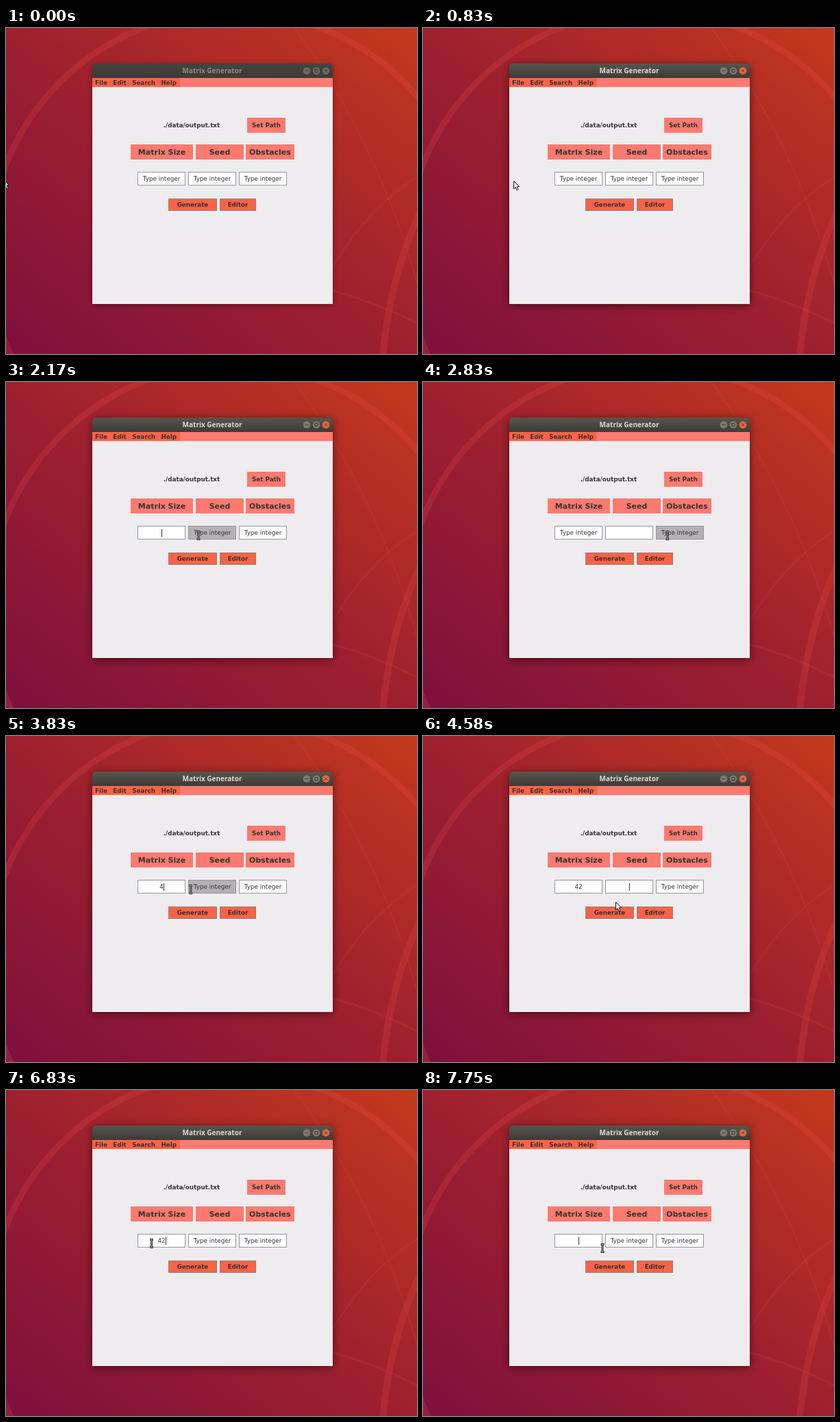
Recreate the animation shown at these times as an HTML page with a canvas. Size 600x476 px, loop 8 s.

```html
<!DOCTYPE html>
<html lang="en">
<head>
<meta charset="utf-8">
<title>Matrix Generator</title>
<style>
  html, body { margin: 0; width: 100%; height: 100%; overflow: hidden; background: #9e202f; }
  canvas { display: block; }
</style>
</head>
<body>
<canvas id="stage" width="600" height="476"></canvas>
<script>
const ctx = document.getElementById('stage').getContext('2d');
const LOOP = 8000, TICK = 1000 / 12, BLINK = 500, GLIDE = 500;
const SANS = '"DejaVu Sans", sans-serif';
const TOMATO = '#ff6347', SALMON = '#fd7a70', INK = '#333', BAR = '#3c3b37';
const FIELDS = 3, EDITOR = 3;
const fieldX = i => 192.5 + 74 * i;

// What the user does; every step has the time it takes effect
const move = (at, x, y) => ({ at, x, y });
const click = (at, field) => ({ at, x: fieldX(field) + 20, y: 224, focus: () => field });
const tab = at => ({ at, focus: current => current + 1 });
const type = (at, key) => ({ at, edit: text => text + key });
const erase = at => ({ at, edit: text => text.slice(0, -1) });

const SCRIPT = [
  move(0, -4, 221),
  click(1040, 0), click(2250, 1), click(2900, 2), click(3495, 0),
  type(3740, '4'), move(3950, 281, 224), type(3990, '2'),
  tab(4495), move(4580, 281, 242), tab(5165), tab(5745),
  move(6500, 164, 232), click(6740, 0), move(7580, 262, 231),
  erase(7660), erase(7745)
];
const STOPS = SCRIPT.filter(step => 'x' in step);

function pointerAt(t) {
  const next = STOPS.findIndex(stop => stop.at > t);
  if (next < 0) return STOPS[STOPS.length - 1];
  const from = STOPS[next - 1], to = STOPS[next];
  const span = Math.min(GLIDE, to.at - from.at);
  const k = Math.max(0, 1 - (to.at - t) / span);
  const ease = k * k * (3 - 2 * k);
  return { x: from.x + (to.x - from.x) * ease, y: from.y + (to.y - from.y) * ease };
}

function stateAt(t) {
  const state = { focus: -1, text: '', caretStart: 0 };
  for (const { at, focus, edit } of SCRIPT) {
    if (at > t) break;
    if (focus) state.focus = focus(state.focus);
    if (edit) state.text = edit(state.text);
    if (focus || edit) state.caretStart = at;
  }
  state.caret = (t - state.caretStart) % (2 * BLINK) < BLINK;
  return state;
}

function box(x, y, w, h, fill, border) {
  ctx.fillStyle = fill;
  ctx.fillRect(x, y, w, h);
  if (border) {
    ctx.strokeStyle = border;
    ctx.lineWidth = 1;
    ctx.strokeRect(x, y, w, h);
  }
}

function label(text, x, y, { size = 8.75, weight = 'bold', color = INK, family = SANS, align = 'center' } = {}) {
  ctx.font = `${weight} ${size}px ${family}`;
  ctx.textAlign = align;
  ctx.fillStyle = color;
  ctx.fillText(text, x, y);
  return ctx.measureText(text).width;
}

function button(text, x, y, w, h, fill, border, size = 8.75) {
  box(x, y, w, h, fill, border);
  label(text, x + w / 2, y + h / 2 + size * 0.36, { size });
}

function line(path, color, width) {
  ctx.strokeStyle = color;
  ctx.lineWidth = width;
  ctx.stroke(new Path2D(path));
}

function gradient(x0, y0, x1, y1, ...colors) {
  const g = ctx.createLinearGradient(x0, y0, x1, y1);
  colors.forEach((color, i) => g.addColorStop(i / (colors.length - 1), color));
  return g;
}

function wallpaper() {
  box(0, 0, 600, 476, gradient(68, 530, 532, -54, '#7d103c', '#9e202f', '#c4391c'));
  const band = 'rgba(235,75,75,.22)', hair = 'rgba(235,80,70,.14)';
  ctx.beginPath();
  ctx.arc(330, 330, 355, 0, 7);
  ctx.strokeStyle = band;
  ctx.lineWidth = 9;
  ctx.stroke();
  line('M550 480Q560 365 604 270', band, 10);
  line('M420 -2Q545 170 602 380', hair, 2);
  line('M476 350Q530 260 604 215', hair, 2);
  line('M476 383Q540 400 604 433', hair, 3);
}

function titleShape(height, fill) {
  ctx.beginPath();
  ctx.roundRect(126, 52, 351, height, [5, 5, 0, 0]);
  ctx.fillStyle = fill;
  ctx.fill();
}

function windowFrame(active) {
  ctx.save();
  ctx.shadowColor = `rgba(0,0,0,${active ? 0.5 : 0.35})`;
  ctx.shadowBlur = active ? 13 : 8;
  ctx.shadowOffsetY = 2;
  titleShape(351, BAR);
  ctx.restore();
  titleShape(21, gradient(0, 52, 0, 73, active ? '#57554d' : '#454440', BAR));
  label('Matrix Generator', 301, 66, {
    size: 10, color: active ? '#dfdbd2' : '#8f8b82', family: '"Open Sans", sans-serif'
  });

  ['M-2.5 0h5', 'M-2 -2h4v4h-4z', 'M-2 -2l4 4m0 -4l-4 4'].forEach((icon, i) => {
    ctx.save();
    ctx.translate(439 + 14 * i, 62.5);
    ctx.beginPath();
    ctx.arc(0, 0, 5.3, 0, 7);
    ctx.fillStyle = !active ? '#6b6962' : i === 2 ? '#ef653b' : '#7d7a70';
    ctx.fill();
    line(icon, BAR, 1);
    ctx.restore();
  });

  box(126, 73, 351, 330, '#eeecee');
  box(126, 73, 351, 13, SALMON);
  box(126, 73, 128, 13, TOMATO);
  box(126, 86, 351, 1, '#f6d3d0');
  let x = 130;
  for (const item of ['File', 'Edit', 'Search', 'Help']) x += label(item, x, 83, { align: 'left' }) + 8.4;
}

function field(i, { focus, text, caret }, hovered) {
  const focused = focus === i, middle = fieldX(i) + 34.5;
  const value = i === 0 ? text : '';
  box(fieldX(i), 210.5, 69, 19, hovered && !focused ? '#b4b1b4' : '#fff', '#94979d');
  const width = label(value || (focused ? '' : 'Type integer'), middle, 223, { size: 8.8, weight: 'normal' });
  if (focused && caret) box(Math.round(middle + width / 2), 215, 1, 11, INK);
}

function form(state, hover) {
  label('./data/output.txt', 271, 145);
  button('Set Path', 352, 131, 56, 22, SALMON);
  button('Matrix Size', 182, 170, 91, 22, SALMON, null, 11);
  button('Seed', 277, 170, 70, 22, SALMON, null, 11);
  button('Obstacles', 350, 170, 71, 22, SALMON, null, 11);
  for (let i = 0; i < FIELDS; i++) field(i, state, hover === i);
  button('Generate', 237.5, 249.5, 70, 17, TOMATO, '#8c7f80');
  button('Editor', 312.5, 249.5, 52, 17, TOMATO, '#8c7f80');
  if (state.focus === EDITOR) line('M323.5 252.5h30v11h-30z', '#b5a9ac', 1);
}

function pointer(x, y, overField) {
  ctx.save();
  ctx.translate(x, y);
  if (overField) {
    const beam = 'M-2.5 -5.5h5M0 -5.5v11M-2.5 5.5h5';
    line(beam, '#222', 2.8);
    line(beam, '#ddd', 0.7);
  } else {
    const arrow = 'M.5 .5v11.5l2.6 -2.4l1.9 4.2l2 -.9l-1.9 -4.1h3.2z';
    ctx.fillStyle = '#fff';
    ctx.fill(new Path2D(arrow));
    line(arrow, '#111', 1);
  }
  ctx.restore();
}

function draw(now) {
  const t = Math.floor((now % LOOP + 5) / TICK) * TICK;
  const { x, y } = pointerAt(t);
  const column = Math.floor((x - fieldX(0)) / 74);
  const inside = y >= 210 && y <= 231 && column >= 0 && column < FIELDS && x <= fieldX(column) + 70;
  wallpaper();
  windowFrame(t >= 800);
  form(stateAt(t), inside ? column : -1);
  pointer(x, y, inside);
}

const start = performance.now();
function loop() {
  draw(performance.now() - start);
  requestAnimationFrame(loop);
}
loop();
</script>
</body>
</html>
```
